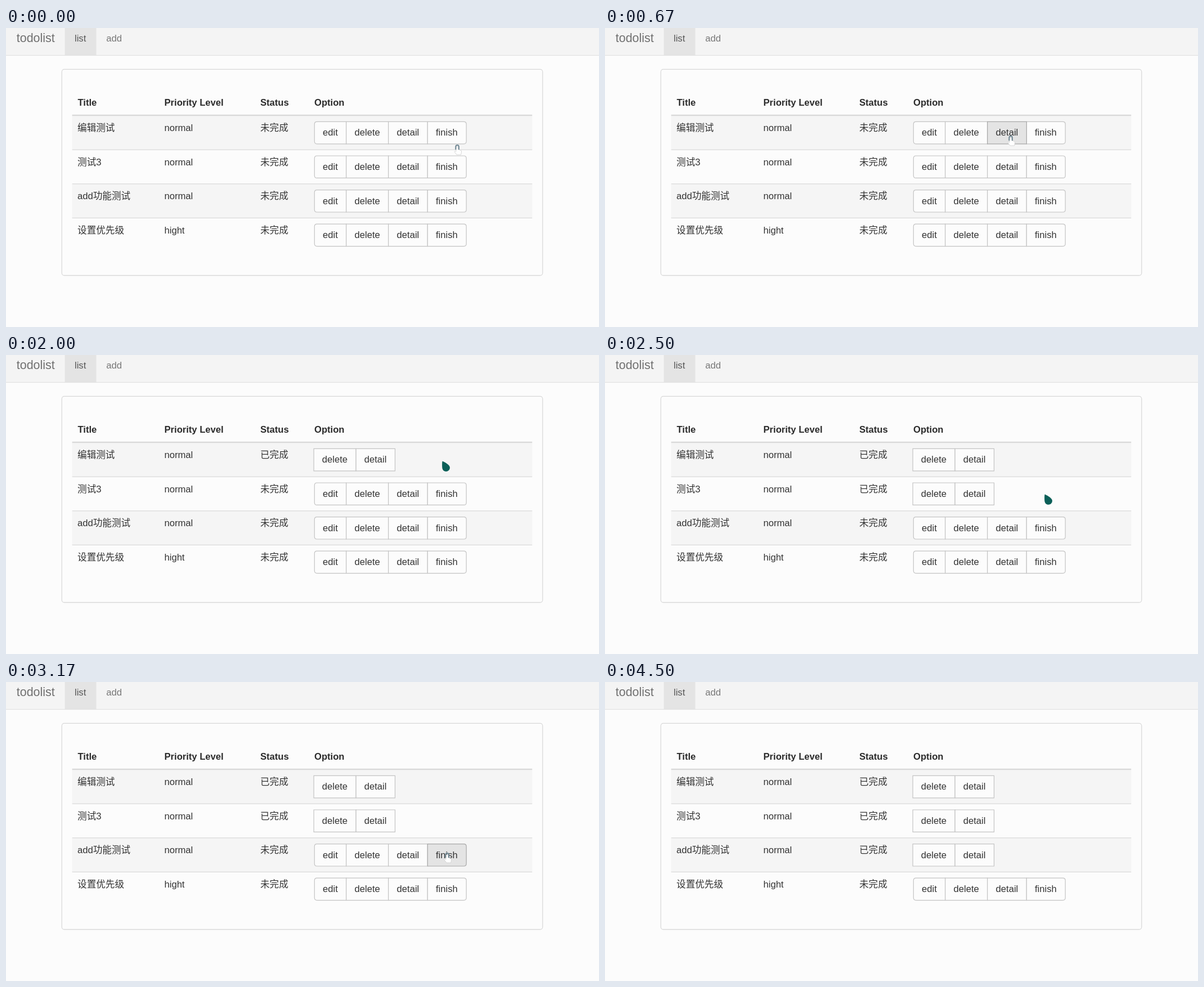
These frames come from a looping animation (1054x531 px, 8 s). An HTML page:

```html
<!DOCTYPE html>
<html lang="zh-CN">
<head>
<meta charset="utf-8">
<title>todolist</title>
<style>
  html, body { margin: 0; width: 100%; height: 100%; overflow: hidden; background: #fcfcfc; }
  svg { display: block; width: 1054px; height: 531px; }
  text { font: 16.6px "Liberation Sans", Arial, "Noto Sans CJK SC", "Noto Sans CJK", sans-serif; fill: #333; white-space: pre; }
  .head { font-weight: bold; fill: #2b2b2b; }
  .nav { fill: #777; }
  .brand { font-size: 21.4px; fill: #707070; }
  .button { fill: #fcfcfc; stroke: #c4c4c4; stroke-width: 1.2; }
  .hover .button { fill: #e4e4e4; stroke: #a8a8a8; }
</style>
</head>
<body>
<svg id="stage" viewBox="0 0 1054 531">
  <rect width="1054" height="531" fill="#fcfcfc"/>
  <rect width="1054" height="48" fill="#f4f4f4"/>
  <rect y="48" width="1054" height="1.2" fill="#e0e0e0"/>
  <rect x="104.6" width="55.8" height="48" fill="#e4e4e4"/>
  <text class="brand" x="18.8" y="25.4">todolist</text>
  <text class="nav" x="122" y="24" style="fill:#555">list</text>
  <text class="nav" x="178.3" y="24">add</text>
  <rect x="99.2" y="74.6" width="854.6" height="366" rx="5" fill="#ededed"/>
  <rect x="99.2" y="73.4" width="854.6" height="366" rx="4.5" fill="#fcfcfc" stroke="#d8d8d8" stroke-width="1.2"/>
  <g id="table"></g>
  <g id="cursor">
    <path id="arrow" fill="#0b5f58" d="M.6 .5C5 2.2 13.4 7 13.9 11.5C14.2 15.7 11 18.8 7.2 18.8C3.2 18.8 .7 16 .3 12C0 8 0 3 .6 .5Z"/>
    <g id="hand">
      <path fill="#fff" stroke="#cfcfcf" stroke-width=".8" d="M-2 5Q0 2 2 5V9L6 10Q8 10.5 7.6 13L6.6 18H-1L-5 12.7Q-5 10.6-2 12Z"/>
      <path fill="none" stroke="#718894" stroke-width="2" d="M-2.7 9V4Q-2.6 1 .2 1Q2.9 1 2.9 4V9"/>
    </g>
  </g>
</svg>
<script>
const LOOP = 8000;
const PITCH = 60.6;
const COLUMNS = [127.5, 281.5, 452, 548];
const TASKS = [
  { title: "编辑测试", level: "normal", doneAt: 1670 },
  { title: "测试3", level: "normal", doneAt: 2500 },
  { title: "add功能测试", level: "normal", doneAt: 3500 },
  { title: "设置优先级", level: "hight", doneAt: Infinity }
];
// [start ms, x, y, hovered button as "row label"]; an arrow is shown unless hand is true
const STEPS = [
  [0, 802, 207, true],
  [170, 787, 192, true, "0 finish"],
  [330, 757, 191, true, "0 finish"],
  [500, 727, 191, true, "0 detail"],
  [670, 721, 191, true, "0 detail"],
  [830, 722, 191, true, "0 detail"],
  [1000, 744, 190, true, "0 detail"],
  [1170, 775, 188, true, "0 finish"],
  [1330, 776, 187, true, "0 finish"],
  [1670, 775, 188, false],
  [2170, 779, 240, true, "1 finish"],
  [2330, 781, 247, true, "1 finish"],
  [2500, 781, 247, false],
  [2670, 783, 280, false],
  [2830, 784, 291, true],
  [3000, 784, 299, true, "2 finish"],
  [3170, 784, 303, true, "2 finish"],
  [3500, 783, 303, false],
  [4000, 783, 322, false],
  [4170, 784, 408, false],
  [4330, 784, 494, false],
  [4500, 784, 560, false]
];

const byId = id => document.getElementById(id);
const table = byId("table");

function add(parent, tag, attrs, content = "") {
  const node = document.createElementNS("http://www.w3.org/2000/svg", tag);
  for (const key in attrs) node.setAttribute(key, attrs[key]);
  node.textContent = content;
  parent.append(node);
  return node;
}

// Rectangle with optional rounding on its left and right sides
function sidedBox(x, y, w, h, left, right) {
  return `M${x + left} ${y}H${x + w - right}q${right} 0 ${right} ${right}V${y + h - right}` +
    `q0 ${right} ${-right} ${right}H${x + left}q${-left} 0 ${-left} ${-left}V${y + left}q0 ${-left} ${left} ${-left}Z`;
}

function addButtons(parent, row, y, specs, radius) {
  const buttons = {};
  specs.forEach(([label, x, width, textX], i) => {
    const group = add(parent, "g", {});
    const left = i ? 0 : radius;
    const right = i === specs.length - 1 ? radius : 0;
    add(group, "path", { class: "button", d: sidedBox(x, y, width, 39.4, left, right) });
    add(group, "text", { x: textX, y: y + 25 }, label);
    buttons[`${row} ${label}`] = group;
  });
  return buttons;
}

["Title", "Priority Level", "Status", "Option"].forEach((label, i) =>
  add(table, "text", { class: "head", x: COLUMNS[i], y: 138 }, label));

const buttons = {};
const rows = TASKS.map((task, i) => {
  const top = 155.6 + i * PITCH;
  const baseline = 183.2 + i * PITCH;
  const buttonTop = 166.4 + i * PITCH;
  if (i % 2 === 0) add(table, "rect", { x: 117.6, y: top, width: 817.6, height: PITCH, fill: "#f5f5f5" });
  const thick = i ? 1.2 : 2.4;
  add(table, "rect", { x: 117.6, y: top - thick / 2 - (i ? 0 : .6), width: 817.6, height: thick, fill: "#d9d9d9" });
  add(table, "text", { x: COLUMNS[0] - .4, y: baseline }, task.title);
  add(table, "text", { x: COLUMNS[1], y: baseline }, task.level);

  const open = add(table, "g", {});
  add(open, "text", { x: COLUMNS[2], y: baseline }, "未完成");
  Object.assign(buttons, addButtons(open, i, buttonTop, [
    ["edit", 548.3, 56.4, 563], ["delete", 604.7, 75, 619.6],
    ["detail", 679.7, 69.6, 694.6], ["finish", 749.3, 68.9, 764]
  ], 4.5));

  const done = add(table, "g", {});
  add(done, "text", { x: COLUMNS[2], y: baseline }, "已完成");
  addButtons(done, i, buttonTop, [["delete", 547.1, 75, 561.8], ["detail", 622.1, 69.4, 636.8]], 0);
  return { open, done };
});

const show = (node, visible) => node.setAttribute("display", visible ? "inline" : "none");

function render(time) {
  const [, x, y, hand, hovered] = STEPS.findLast(step => step[0] <= time);
  rows.forEach(({ open, done }, i) => {
    const finished = time >= TASKS[i].doneAt;
    show(open, !finished);
    show(done, finished);
  });
  for (const key in buttons) {
    const active = key === hovered;
    buttons[key].classList.toggle("hover", active);
    // The active button's border lies over its neighbours
    if (active && buttons[key].nextSibling) buttons[key].parentNode.append(buttons[key]);
  }
  byId("cursor").setAttribute("transform", `translate(${x} ${y})`);
  show(byId("hand"), hand);
  show(byId("arrow"), !hand);
}

const start = performance.now();
function tick() {
  render((performance.now() - start) % LOOP);
  requestAnimationFrame(tick);
}
tick();
</script>
</body>
</html>
```
